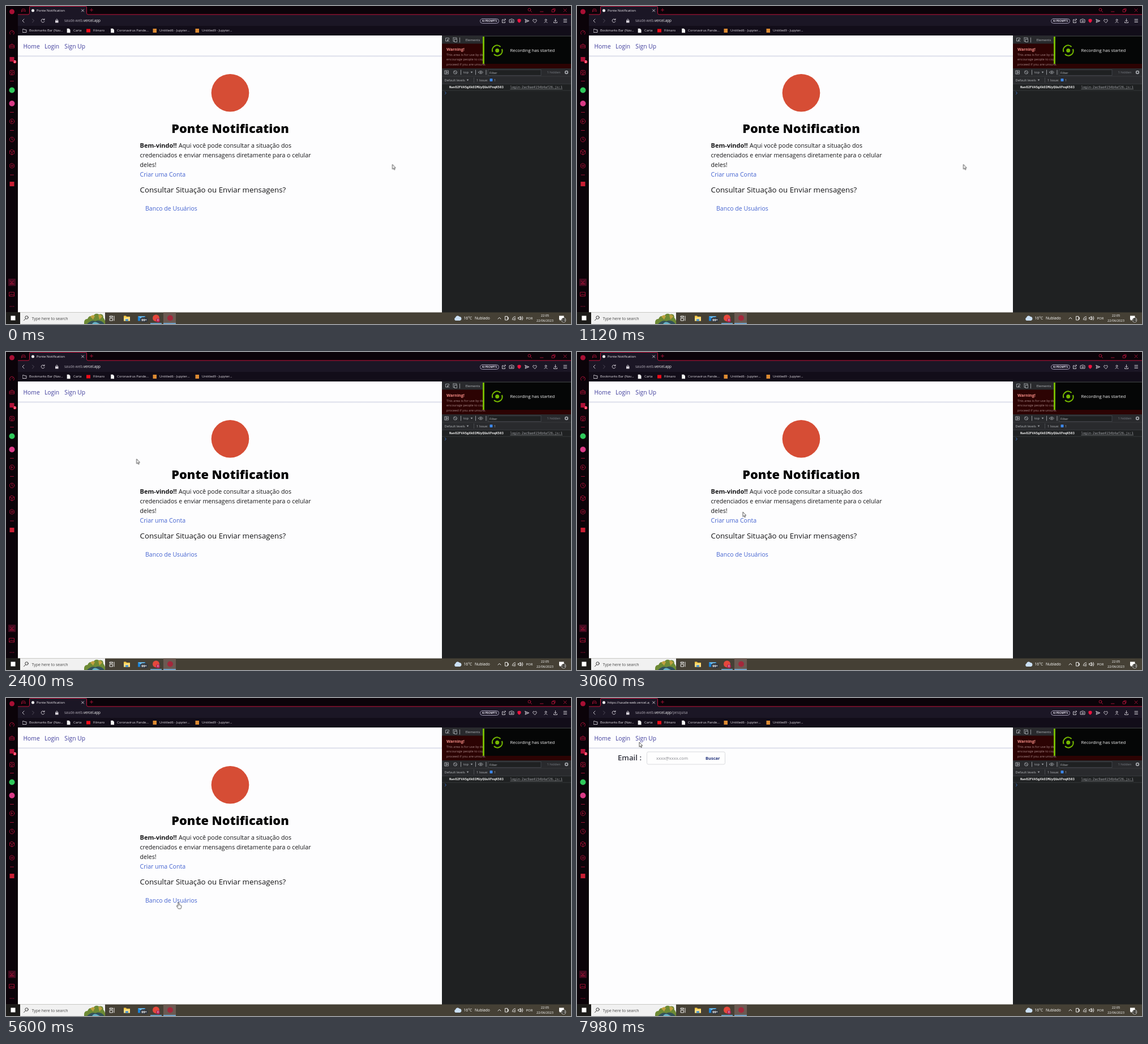
Write an HTML page that moves like this. It is 998 by 561 pixels and loops after 8 s.

```html
<!DOCTYPE html>
<html lang="pt">
<head>
<meta charset="utf-8">
<title>Screen recording</title>
<style>
html, body { margin: 0; width: 100%; height: 100%; overflow: hidden; background: #0b0309; }
svg { display: block; width: 998px; height: 561px; }
text { font-family: "Open Sans", "Noto Sans", sans-serif; white-space: pre; }
.mono { font-family: "DejaVu Sans Mono", monospace; font-size: 5.7px; }
.b { font-weight: 700; }
.mid { text-anchor: middle; }
.body { font-size: 10.65px; fill: #141416; }
.link { font-size: 10.55px; fill: #4463d0; }
.nav { font-size: 10.3px; fill: #3f3d9c; }
.tab { font-size: 5.95px; fill: #f2eef2; }
.mark { font-size: 5.8px; fill: #e4dfe6; }
.url { font-size: 6.3px; fill: #aaa5b0; }
.dev { font-size: 5.8px; fill: #b4b6ba; }
.line { fill: none; stroke-width: 0.9; stroke-linecap: round; stroke-linejoin: round; }
.red { stroke: #b01238; }
.pale { stroke: #d9d4dc; }
.grey { stroke: #a2a5aa; }
.white { stroke: #fff; }
.ring { fill: none; stroke: #76b900; stroke-width: 2.2; }

.home, .search, .arrow, .hand { animation: 8s step-end infinite; }
.home { animation-name: home; }
.search { animation-name: search; }
.arrow { animation-name: arrow; }
.hand { animation-name: hand; }
.pointer { animation: travel 8s linear infinite; }

@keyframes home { 0% { opacity: 1 } 87.5%, 100% { opacity: 0 } }
@keyframes search { 0% { opacity: 0 } 87.5%, 100% { opacity: 1 } }
@keyframes hand { 0% { opacity: 0 } 39% { opacity: 1 } 40.2% { opacity: 0 } 46.5% { opacity: 1 } 87.5%, 100% { opacity: 0 } }
@keyframes arrow { 0% { opacity: 1 } 39% { opacity: 0 } 40.2% { opacity: 1 } 46.5% { opacity: 0 } 87.5%, 100% { opacity: 1 } }
@keyframes travel {
  0% { transform: translate(682.5px, 279.5px) }
  14% { transform: translate(682.5px, 279.5px); animation-timing-function: ease-in }
  20.75% { transform: translate(490px, 137px) }
  23%, 24.25% { transform: translate(300px, 106px) }
  27.5% { transform: translate(242px, 140px) }
  30.6% { transform: translate(228px, 200px) }
  33.5%, 34.75% { transform: translate(262px, 260px) }
  38.25% { transform: translate(293px, 282px) }
  41.25% { transform: translate(292px, 315px) }
  44%, 45.25% { transform: translate(281px, 338px) }
  49.25%, 52.5% { transform: translate(297.2px, 364px) }
  59.25% { transform: translate(304.8px, 360.3px) }
  92.75% { transform: translate(304.8px, 360.3px); animation-timing-function: ease-in }
  96.25% { transform: translate(170px, 190px) }
  98.5% { transform: translate(96px, 105px) }
  99.75%, 100% { transform: translate(110px, 78px) }
}
</style>
</head>
<body>
<svg viewBox="0 0 998 561">
  <defs>
    <linearGradient id="shade" x2="0" y2="1">
      <stop stop-color="#d2d5e4"/><stop offset="1" stop-color="#fdfdfe"/>
    </linearGradient>
    <clipPath id="tabClip"><path d="M53 0h75v15h-75z"/></clipPath>
    <path id="doc" d="M-2.8-3.8h3.6l2.2 2.2v5.4h-5.8z" fill="#f4f4f4"/>
    <path id="down" d="M-1.8-1.2h3.6l-1.8 2.6z" fill="#a2a5aa"/>
    <path id="dash" d="M-3 0h6" class="line red"/>
  </defs>

  <!-- browser frame -->
  <path d="M0 0h998v541h-998z" fill="#0b0309"/>
  <path d="M21 15h977v20h-977z" fill="#1b1625"/>
  <path d="M21 35h977v17h-977z" fill="#120d19"/>
  <path d="M41.500 .5h101.500v15h-101.500z" fill="#1b1625"/>
  <path d="M21 15h18q2.500 0 2.500-2.500v-10q0-2 2-2h97q2 0 2 2v10q0 2.500 2.500 2.500h853" fill="none" stroke="#c4123a"/>
  <g class="line red">
    <path d="M27.500 10v-2.500l1-2h4.500l1 2v2.500l-1.500-1.500h-3.500zM151 4.500v5M148.500 7h5"/>
    <circle cx="924.500" cy="6.500" r="2.400"/>
    <path d="M926.500 8.500l2.200 2.200M943.500 10h5.500M964.500 6.500h4v4h-4zM966 6.500v-1.700h4v4h-1.500M985 5l5 5M990 5l-5 5"/>
  </g>
  <circle cx="47.500" cy="8" r="2.500" fill="#fff"/>
  <g clip-path="url(#tabClip)">
    <text class="tab home" x="54" y="10.300">Ponte Notification</text>
    <text class="tab search" x="54" y="10.300">https://saude-web.vercel.app/pesquisa</text>
  </g>
  <path class="line pale" d="M133.500 6l4 4M137.500 6l-4 4"/>

  <!-- address bar -->
  <path class="line pale" d="M32 23l-3 3 3 3M67.500 24a3 3 0 1 0 .5 3M68 22.500v2h-2"/>
  <path class="line" d="M46.500 23l3 3-3 3" stroke="#5b5562"/>
  <path d="M87 25.500h5.500v4h-5.500z" fill="#d9d4dc"/>
  <path class="line pale" d="M88.300 25.500v-1.500q1.400-2 2.900 0v1.500"/>
  <text class="url" x="103" y="28.300">saude-web.<tspan fill="#fff">vercel.app</tspan><tspan class="search">/pesquisa</tspan></text>
  <rect class="line" x="837.500" y="22.500" width="33" height="8" rx="4" stroke="#b3abc6"/>
  <text class="mid b" x="854" y="28" font-size="4.400" fill="#e4dfee">AI PROMPTS</text>
  <g class="line pale">
    <path d="M879 24h-2.500v5.500h5v-2M879 27q.5-3 3.500-3.500M881 22.500l1.500 1-1 1.500"/>
    <path d="M889.500 24h1.500l1-1h2.500l1 1h1.500v5h-7.500z"/><circle cx="893.300" cy="26.500" r="1.300"/>
    <path d="M917 23.500l7 2.800-7 2.900 1-2.900zM918 26.300h3"/>
    <path d="M934 29.500l-3-3q-1-2.300 1-3 1.300 0 2 1.200.7-1.200 2-1.200 2 .7 1 3z"/>
    <circle cx="953.500" cy="24.700" r="1.400"/><path d="M951 29.300q2.500-3.500 5 0"/>
    <path d="M970.500 22.500v4.500M968.700 25.500l1.800 1.800 1.800-1.800M967.500 28v1.500h6v-1.500M985 23.500h5.500M985 26h5.500M985 28.500h5.500"/>
  </g>
  <path d="M903.500 23.500l3-1 3 1v3q-.5 2-3 3.300-2.500-1.300-3-3.300z" fill="#f0123f"/>

  <!-- bookmarks -->
  <path class="line pale" d="M29.500 41h2.500l1 1h3v4.500h-6.500z"/>
  <text class="mark" x="41" y="45.300">Bookmarks Bar (Nav...</text>
  <use href="#doc" x="110.500" y="43.500"/><text class="mark" x="119" y="45.300">Carta</text>
  <rect x="142" y="40.500" width="7" height="6" fill="#f00b18"/><text class="mark" x="154" y="45.300">Filmaro</text>
  <use href="#doc" x="188" y="43.500"/><text class="mark" x="196" y="45.300">Coronavirus Pande...</text>
  <rect x="259.500" y="40" width="6.500" height="7" fill="#dc8a32"/><text class="mark" x="271" y="45.300">Untitled6 - Jupyter...</text>
  <rect x="334.500" y="40" width="6.500" height="7" fill="#dc8a32"/><text class="mark" x="346" y="45.300">Untitled9 - Jupyter...</text>

  <!-- sidebar -->
  <circle cx="10.500" cy="10" r="4.500" fill="#a80f34"/>
  <g class="line red">
    <path d="M7.500 50a4 4 0 1 1 6 0M10.500 47l2-2M6.500 69h8v5h-8zM8.500 69q2-5 4 0M6.500 71.500h8"/>
    <rect x="6.500" y="113.500" width="8" height="8" rx="2"/><circle cx="10.500" cy="117.500" r="2"/><path d="M10.500 119.500v2"/>
    <circle cx="10.500" cy="203.500" r="4.200"/><path d="M9.500 202l2.500 1.500-2.500 1.500z"/>
    <circle cx="10.500" cy="235.500" r="4.200"/><path d="M10.500 233v2.700l1.800 1"/>
    <path d="M10.500 253.500l4 2.200v4.600l-4 2.200-4-2.200v-4.600zM6.500 255.700l4 2.300 4-2.300M10.500 258v4.500"/>
    <path d="M10.500 277.700l3.800 2.100v4.400l-3.800 2.100-3.800-2.100v-4.400z"/><circle cx="10.500" cy="282" r="1.500"/>
    <path d="M6 505h8.500v7h-8.500zM6.500 511l2.500-3 2 2 1.500-1.500 2 2.500"/>
  </g>
  <use href="#dash" x="10.500" y="132.500"/><use href="#dash" x="10.500" y="187.500"/>
  <use href="#dash" x="10.500" y="219.500"/><use href="#dash" x="10.500" y="298"/>
  <rect x="6.500" y="90" width="8" height="8" fill="#b01238"/>
  <circle cx="15.500" cy="98.500" r="2.800" fill="#f5163f"/><text class="mid b" x="15.500" y="100.200" font-size="4.500" fill="#fff">2</text>
  <circle cx="10.500" cy="148.500" r="5" fill="#2fc85a"/>
  <circle cx="10.500" cy="172" r="5" fill="#d93a86"/>
  <rect x="6.500" y="310" width="8" height="8" fill="#c91d33"/>
  <rect x="4" y="481" width="13" height="13" rx="1" fill="#430b20"/>
  <path class="line red" d="M7 484.500l6 6M13.500 484.500l-6 6M7 490.500h7"/>
  <g fill="#b01238"><circle cx="7.500" cy="530" r=".8"/><circle cx="10.500" cy="530" r=".8"/><circle cx="13.500" cy="530" r=".8"/></g>

  <!-- web page -->
  <path d="M21 52h749v489h-749z" fill="#fdfdfe"/>
  <path d="M21 87.500h749v3h-749z" fill="url(#shade)"/>
  <text class="nav" x="30.500" y="74.500">Home</text>
  <text class="nav" x="68" y="74.500">Login</text>
  <text class="nav" x="103.300" y="74.500">Sign Up</text>

  <g class="home">
    <circle cx="396" cy="153.300" r="33.300" fill="#d64d35"/>
    <text class="mid" x="396" y="223.500" font-size="21.800" font-weight="800" fill="#050505">Ponte Notification</text>
    <text class="body b" x="236.500" y="250.200" style="font-size:11px">Bem-vindo!!</text>
    <text class="body" x="305" y="250.200">Aqui você pode consultar a situação dos</text>
    <text class="body" x="236.500" y="267">credenciados e enviar mensagens diretamente para o celular</text>
    <text class="body" x="236.500" y="283.600">deles!</text>
    <text class="link" x="236.500" y="300.500">Criar uma Conta</text>
    <text class="body" x="236.500" y="329.200" style="font-size:13.3px">Consultar Situação ou Enviar mensagens?</text>
    <text class="link" x="246" y="360.700">Banco de Usuários</text>
  </g>

  <g class="search">
    <text x="72" y="109.500" font-size="13.200" font-weight="600" fill="#30313c">Email :</text>
    <rect x="123.500" y="95" width="138" height="22" rx="2.500" fill="#fefefe" stroke="#d9dade"/>
    <text x="140" y="108.700" font-size="7.600" fill="#85868c">xxxx@xxxx.com</text>
    <text class="b" x="227" y="108.700" font-size="7.500" fill="#26367e">Buscar</text>
  </g>

  <!-- developer panel -->
  <path d="M770 52h228v489h-228z" fill="#1f2122"/>
  <path d="M770 52h228v14.500h-228zM770 110h228v27.500h-228z" fill="#292a2d"/>
  <path d="M770 66.500h228v43.500h-228z" fill="#2c0303"/>
  <path d="M770 124h228M770 137.500h228M770 149h228" stroke="#3d3f44" stroke-width=".7"/>
  <g class="line grey">
    <path d="M781 62h-4.500v-5.500h6v2M779.500 59.500l3.500 3M779.500 59.500v2.500M779.500 59.500h2.500"/>
    <path d="M790 56h6v2M790 56v6.500h2M792.500 58.500h4v5h-4zM801.500 56v8"/>
    <path d="M775 114h6.500v6h-6.500zM777 114v6M778.500 115.800l2 1.200-2 1.200z"/>
    <circle cx="793.500" cy="117" r="3"/><path d="M791.500 115l4 4M803.500 113v8M829.500 113v8M848 113v8"/>
    <path d="M834.500 117q4-5 8 0-4 5-8 0z"/><circle cx="838.500" cy="117" r="1"/>
    <circle cx="990" cy="117" r="2.300" style="stroke-width:1.8"/>
  </g>
  <text class="dev" x="811.500" y="61.500" style="font-size:6px">Elements</text>
  <text class="b" x="778" y="78.500" font-size="7.100" fill="#f28b84">Warning!</text>
  <g fill="#a88787" font-size="5.700">
    <text x="778" y="87.700">This area is for use by developers</text>
    <text x="778" y="96.200">encourage people to copy code</text>
    <text x="778" y="104.500">proceed if you are unsure.</text>
  </g>
  <text class="dev" x="808" y="119.200">top</text><use href="#down" x="822.500" y="117"/>
  <rect x="851.500" y="112.500" width="93.500" height="10" fill="#1f2122" stroke="#484a50" stroke-width=".8"/>
  <text class="dev" x="854" y="119.700">Filter</text>
  <text class="dev" x="955.500" y="119.200" style="fill:#777b82">1 hidden</text>
  <text class="dev" x="774.500" y="132.800">Default levels</text><use href="#down" x="815.500" y="130.800"/>
  <path d="M826.500 126v9" stroke="#494b50"/>
  <text class="dev" x="831" y="132.800">1 Issue:</text>
  <rect x="854.500" y="128" width="5" height="5" rx=".8" fill="#3d86e8"/>
  <text class="dev" x="862" y="132.800">1</text>
  <text class="mono b" x="783" y="145.200" fill="#f0f0f0">NwvO2FVA5gXkOIMUyQUuXFnqK503</text>
  <text class="mono" x="890.500" y="145.200" fill="#a3a5aa" text-decoration="underline">login-2ac9ae4154b4af26.js:1</text>
  <path class="line" d="M775.500 151.500l2 2-2 2" stroke="#3f7bd6"/>

  <!-- recorder notice -->
  <path d="M842 54h156v48h-156z" fill="#050606"/>
  <path d="M842 54h3v48h-3z" fill="#76b900"/>
  <path class="ring" d="M859.500 81a8.500 8.500 0 0 1 14-9M876 76a8.500 8.500 0 0 1-14 9"/>
  <circle cx="867.700" cy="78.500" r="3.500" fill="#76b900"/>
  <text x="890.500" y="81.300" font-size="7.750" fill="#f4f4f4">Recording has started</text>

  <!-- taskbar -->
  <path d="M0 540.500h998v20.500h-998z" fill="#454035"/>
  <path d="M0 540.500h25v20.500h-25z" fill="#1d1c1a"/>
  <rect x="8.500" y="546.500" width="8" height="8" fill="#fff"/>
  <path d="M25 540.500h150v20.500h-150z" fill="#f1f1f1"/>
  <circle cx="36.500" cy="549.500" r="2.700" class="line" stroke="#222"/>
  <path class="line" d="M34.500 551.700l-3 3" stroke="#222"/>
  <text x="45.500" y="553.500" font-size="7" fill="#444">Type here to search</text>
  <path d="M138 561q-1-9 6-9 3-7 9-4 5-8 11-4 8-2 8 6 4 4 3 11z" fill="#6d8a35"/>
  <path d="M149 548q4-5 8-1l-3 6zM163 545q5-2 7 3l-5 5z" fill="#c0a13f"/>
  <path d="M143 561q8-8 15-5 9-4 16 5z" fill="#33515a"/>
  <path d="M152 561q3-5 8-3l6 3z" fill="#68b4c9"/>
  <path class="line white" d="M183.500 547h5v2h-5zM183.500 551h5v4h-5zM191 547v8"/>
  <path d="M208 546.500h4l1 1.500h6v7.500h-11z" fill="#f7c844"/><path d="M208 549.500h11v6h-11z" fill="#ffdf82"/><path d="M211 552.500h5v3h-5z" fill="#3d91d8"/>
  <path d="M233 547.500h13v8h-13z" fill="#1b83d6"/><path d="M233 547.500l6.500 4 6.500-4" fill="#7ccaf6"/>
  <rect x="237" y="549" width="14" height="9" rx="4.500" fill="#343940"/><text class="mid b" x="244" y="555.500" font-size="5.600" fill="#fff">99+</text>
  <circle cx="265" cy="550.500" r="6" fill="#e5483c"/>
  <circle cx="268.500" cy="554.500" r="3.400" fill="#b31f55"/><text class="mid" x="268.500" y="556.300" font-size="4.800" fill="#fff">R</text>
  <path d="M278 540.500h22v20.500h-22z" fill="#6b5a52"/>
  <circle cx="290" cy="550.500" r="5" fill="#a3283c"/>
  <path d="M255 560h20M278 560h22" stroke="#76b9ed" stroke-width="1.500"/>
  <path d="M794 555a3 3 0 0 1 0-5.500 4 4 0 0 1 7-1.500 3.600 3.600 0 0 1 1 7z" fill="#cbe0f5"/>
  <g fill="#fff" font-size="6.700">
    <text x="808.500" y="553.200">16°C</text><text x="828" y="553.200">Nublado</text>
    <text x="918.500" y="553" font-size="5.900">POR</text>
    <text class="mid" x="952" y="548.300" font-size="5.700">22:05</text>
    <text class="mid" x="952" y="557.300" font-size="5.650">22/06/2023</text>
  </g>
  <g class="line white">
    <path d="M869 552l2.500-2.500 2.500 2.500M882 547.500h4v6.500h-4zM886 549.500h1.500v3h-1.500M894.500 553.500q0-5 5-5.500M896.500 554q0-3 3.500-3.500M898.500 554.300q0-1.300 1.500-1.500"/>
    <path d="M905 549.500h1.500l2-2v6.500l-2-2h-1.500zM910 549q1.500 2 0 4M911.800 547.500q2.500 3.300 0 6.600"/>
  </g>
  <path d="M977 546.500h8.500v7h-5l-2 2v-2h-1.500z" fill="#fff"/>
  <circle cx="985" cy="554" r="4" fill="#2b2924" stroke="#fff" stroke-width=".6"/><text class="mid" x="985" y="556" font-size="5.300" fill="#fff">14</text>

  <!-- pointer -->
  <g class="pointer" stroke="#222" stroke-width=".75" stroke-linejoin="round" fill="#fff">
    <path class="arrow" d="M0 0v8.300l1.900-1.700 1.300 2.900 1.300-.6-1.300-2.800h2.500z"/>
    <path class="hand" d="M-1 1q1-1.600 2 0v3.700l3.200.8q1 .3.900 1.600l-.5 2.600-.8 1.900h-4l-3-4.200q-.8-1.500.6-1.500l1.600 1.400z"/>
  </g>
</svg>
</body>
</html>
```
